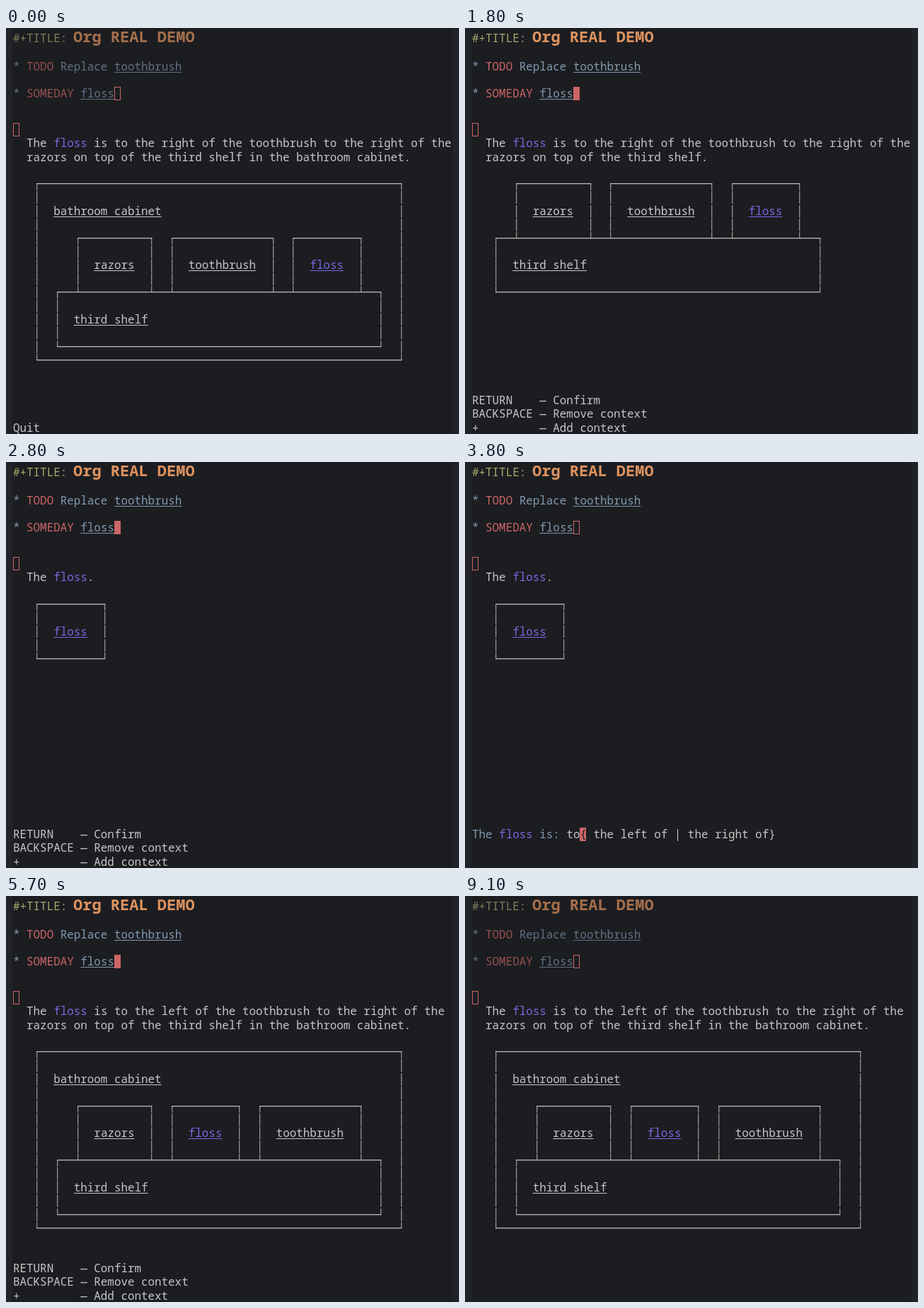
Recreate the animation shown at these times as an HTML page with a canvas. Size 640x573 px, loop 9.9 s.

```html
<!DOCTYPE html>
<html>
<head>
<meta charset="utf-8">
<title>Org REAL demo</title>
<style>
  html, body { margin: 0; width: 100%; height: 100%; overflow: hidden; background: #1c1d21; }
  canvas { display: block; }
</style>
</head>
<body>
<canvas id="stage" width="640" height="573"></canvas>
<script>
const ctx = document.getElementById('stage').getContext('2d');
const LOOP = 9900, LEFT = 10, CELL = 9.53, ROW = 19.1, COLS = 65;
const FAMILY = '"Noto Sans Mono", "DejaVu Sans Mono", monospace';
const BODY = `500 15.88px ${FAMILY}`, TITLE = `bold 22px ${FAMILY}`;
const BG = '#1c1d21', FRINGE = '#222328', TEXT = '#c5c7c6', LINE = '#b9bab8',
      SIDE = '#96938e', LINK = '#7869e0', RED = '#cc6666';
const BRIGHT = { key: '#aaa66c', title: '#de935f', todo: '#cc6666', head: '#8199b0' };
const DIM = { key: '#817e57', title: '#a66f4b', todo: '#955050', head: '#5f7183' };

const HELP = ['RETURN    — Confirm', 'BACKSPACE — Remove context', '+         — Add context'];
const TRUNCATE = ['Truncate long lines enabled'];

const colX = c => LEFT + c * CELL;
const rowY = r => 163 + r * ROW;

function put(text, col, y, color = TEXT, underline = false) {
  const base = Math.round(y + 5.4);
  ctx.fillStyle = color;
  ctx.fillText(text, colX(col), base);
  if (underline) ctx.fillRect(colX(col), base + 2, text.length * CELL, 1);
}

function cursor(col, y, solid) {
  const x = Math.round(colX(col)), top = Math.round(y - 10);
  if (solid) {
    ctx.fillStyle = RED;
    ctx.fillRect(x, top, 9, 19);
  } else {
    ctx.strokeStyle = RED;
    ctx.strokeRect(x + .5, top + .5, 8, 18);
  }
}

// Box on the character grid; an open box rests on the line below it.
function box(name, col, row, width, height, open = false) {
  const last = row + height - 1;
  const x1 = Math.round(colX(col + .5)), x2 = Math.round(colX(col + width - .5));
  const top = Math.round(rowY(row)) - 1, bottom = Math.round(rowY(last)) - 1;
  ctx.fillStyle = SIDE;
  for (let r = row; r <= last; r++) {
    const a = r === row ? top : Math.round(rowY(r) - 9);
    const b = r === last ? bottom : Math.round(rowY(r) + 9);
    for (const x of [x1, x2]) ctx.fillRect(x, a, 1.3, b - a);
  }
  ctx.fillStyle = LINE;
  ctx.fillRect(x1, top, x2 - x1 + 1.3, 1.3);
  if (!open) ctx.fillRect(x1, bottom, x2 - x1 + 1.3, 1.3);
  put(name, col + 3, rowY(row + 2), name === 'floss' ? LINK : TEXT, true);
}

function items(names, col, row, open) {
  for (const name of names) {
    box(name, col, row, name.length + 6, 5, open);
    col += name.length + 8;
  }
}

function shelf(names, col, row) {
  items(names, col + 3, row, true);
  box('third shelf', col, row + 4, 49, 5);
}

function cabinet(names) {
  box('bathroom cabinet', 3, 3, 55, 14);
  shelf(names, 6, 7);
}

const RIGHT = ['razors', 'toothbrush', 'floss'];
const SWAPPED = ['razors', 'floss', 'toothbrush'];
const toRight = ' is to the right of the toothbrush';
const views = {
  full: [[toRight + ' to the right of the', 'razors on top of the third shelf in the bathroom cabinet.'],
         () => cabinet(RIGHT)],
  shelf: [[toRight + ' to the right of the', 'razors on top of the third shelf.'],
          () => shelf(RIGHT, 3, 3)],
  three: [[toRight + ' to the right of the', 'razors.'], () => items(RIGHT, 3, 3)],
  two: [[toRight + '.'], () => items(RIGHT.slice(1), 3, 2)],
  one: [['.'], () => items(['floss'], 3, 2)],
  moved: [[' is to the left of the toothbrush to the right of the',
           'razors on top of the third shelf in the bathroom cabinet.'],
          () => cabinet(SWAPPED)]
};

const ask = (prompt, typed, rest) => ({ prompt, typed, rest });
const WHERE = 'The floss is: ', WHAT = 'The floss is to the left of the: ';
const PLACES = '{ | in | on | behind | in front of | above | below | ' +
               'to the left of | to the right of | on top of}';
const THINGS = '{ | bathroom cabinet | third shelf | razors | toothbrush}';

// start, view, echo area, dimmed
const steps = [
  [0, 'full', ['Quit'], true],
  [500, 'full', ['Quit']],
  [1000, 'full', TRUNCATE],
  [1200, 'full', HELP],
  [1800, 'shelf', HELP],
  [2100, 'three', HELP],
  [2400, 'two', HELP],
  [2700, 'one', HELP],
  [3400, 'one', ask(WHERE, '', PLACES)],
  [3800, 'one', ask(WHERE, 'to', '{ the left of | the right of}')],
  [4000, 'one', ask(WHERE, 'to the l', '[eft of]')],
  [4300, 'one', ask(WHAT, '', THINGS)],
  [4900, 'one', ask(WHAT, 't', '{hird shelf | oothbrush}')],
  [5000, 'one', ask(WHAT, 'to', '[othbrush]')],
  [5200, 'one', ask(WHAT, 'toot', '[hbrush]')],
  [5500, 'moved', HELP],
  [6800, 'moved', []],
  [8900, 'moved', [], true]
];

function heading(dim, solid) {
  const c = dim ? DIM : BRIGHT;
  ctx.font = TITLE;
  ctx.fillStyle = c.title;
  ctx.fillText('Org REAL DEMO', 95, 20);
  ctx.font = BODY;
  put('#+TITLE:', 0, 15, c.key);
  put('*', 0, 55, c.head);
  put('TODO', 2, 55, c.todo);
  put('Replace', 7, 55, c.head);
  put('toothbrush', 15, 55, c.head, true);
  put('*', 0, 93, c.head);
  put('SOMEDAY', 2, 93, c.todo);
  put('floss', 10, 93, c.head, true);
  cursor(15, 93, solid);
}

// Hooked arrow marking a wrapped line; dir 1 points right, -1 left.
function wrapMark(x, y, dir) {
  ctx.save();
  ctx.translate(x, y);
  ctx.scale(dir, 1);
  ctx.strokeStyle = TEXT;
  ctx.lineWidth = 1.4;
  ctx.beginPath();
  ctx.moveTo(-3, -3);
  ctx.lineTo(1, -3);
  ctx.quadraticCurveTo(4, -1, 2, 2);
  ctx.lineTo(-3, 2);
  ctx.moveTo(0, -1);
  ctx.lineTo(-3, 2);
  ctx.lineTo(0, 4);
  ctx.stroke();
  ctx.restore();
}

function question({ prompt, typed, rest }) {
  const line = prompt + typed + rest, at = prompt.length + typed.length, y = rowY(19);
  put('The', 0, y, BRIGHT.head);
  put('floss', 4, y, LINK);
  put(prompt.slice(9), 9, y, BRIGHT.head);
  put(line.slice(prompt.length, COLS), prompt.length, y);
  cursor(at, y, true);
  put(line[at], at, y, BG);
  if (line.length > COLS) {
    put(line.slice(COLS), 0, rowY(20));
    wrapMark(635, y, 1);
    wrapMark(4, rowY(20), -1);
  }
}

function draw(t) {
  const [, view, echo, dim] = steps.findLast(s => s[0] <= t);
  const [sentence, diagram] = views[view];
  const asking = !Array.isArray(echo);

  ctx.fillStyle = BG;
  ctx.fillRect(0, 0, 640, 573);
  ctx.fillStyle = FRINGE;
  ctx.fillRect(0, 0, 9, 573);
  ctx.fillRect(631, 0, 9, 573);
  ctx.lineWidth = 1;

  heading(dim, !dim && !asking);
  cursor(0, 144, false);
  put('The', 2, rowY(0));
  put('floss', 6, rowY(0), LINK);
  put(sentence[0], 11, rowY(0));
  if (sentence[1]) put(sentence[1], 2, rowY(1));
  diagram();

  if (asking) question(echo);
  else echo.forEach((s, i) => put(s, 0, rowY(22 - echo.length + i)));
}

const start = performance.now();
function tick() {
  draw((performance.now() - start) % LOOP);
  requestAnimationFrame(tick);
}
tick();
</script>
</body>
</html>
```
